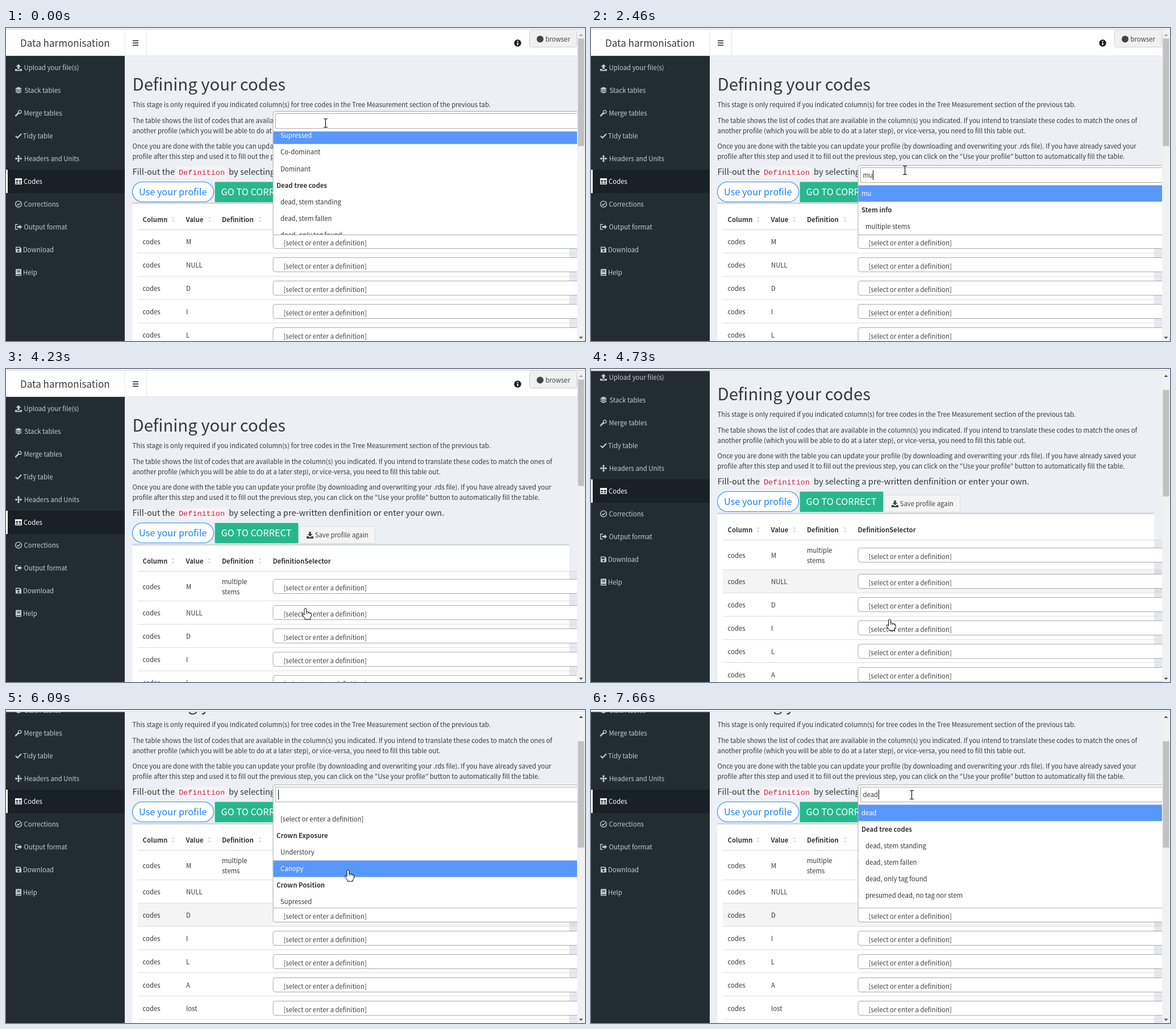
An HTML page with a canvas for the animation above (8000 ms loop, 1019 by 550 pixels).

```html
<!DOCTYPE html>
<html lang="en">
<head>
<meta charset="utf-8">
<title>Data harmonisation</title>
<style>
html, body { margin: 0; width: 100%; height: 100%; overflow: hidden; background: #ecf0f5; }
canvas { display: block; width: 1019px; height: 550px; }
</style>
</head>
<body>
<canvas id="stage" width="1019" height="550"></canvas>
<script>
const ctx = document.getElementById('stage').getContext('2d');
const LOOP = 8000, RIGHT = 1005, ITEM = 29.1, ROW = 40.9, TABLE_TOP = 355.8;
// The Korean face comes first because its curly quotes are proportional
const SANS = '"Noto Sans CJK KR", "Noto Sans CJK SC", "Noto Sans CJK JP", "Open Sans", sans-serif';
const INK = '#383838';
const PROMPT = '[select or enter a definition]';
const ZOOM = 0.909 / 1.117; // page zoom, corrected for the larger CJK Latin glyphs

const MENU = ['Upload your file(s)', 'Stack tables', 'Merge tables', 'Tidy table', 'Headers and Units',
  'Codes', 'Corrections', 'Output format', 'Download', 'Help'];
const MENU_X = [31.5, 32.5, 31.5, 30, 32, 31, 31.5, 31.5, 30, 30];
const VALUES = ['M', 'NULL', 'D', 'I', 'L', 'A', 'lost', 'B'];
const INTRO = [
  [139, 'This stage is only required if you indicated column(s) for tree codes in the Tree Measurement section of the previous tab.'],
  [166.5, 'The table shows the list of codes that are available in the column(s) you indicated. If you intend to translate these codes to match the ones of'],
  [184.7, 'another profile (which you will be able to do at a later step), or vice-versa, you need to fill this table out.'],
  [212, 'Once you are done with the table you can update your profile (by downloading and overwriting your .rds file). If you have already saved your'],
  [230.2, 'profile after this step and used it to fill out the previous step, you can click on the “Use your profile” button to automatically fill the table.']
];
const GROUPS = [
  ['', [PROMPT]],
  ['Crown Exposure', ['Understory', 'Canopy']],
  ['Crown Position', ['Supressed', 'Co-dominant', 'Dominant']],
  ['Dead tree codes', ['dead, stem standing', 'dead, stem fallen', 'dead, only tag found',
    'presumed dead, no tag nor stem', 'dead, cause unknown']],
  ['Stem info', ['multiple stems']]
];

// Stepped values: [start time, ...value]
const POINTER = [
  [0, 'beam', 562, 167], [2190, 'beam', 560, 186], [2310, 'beam', 557, 208], [2460, 'beam', 552, 250],
  [2580, 'hand', 545, 292], [2700, 'hand', 537, 337], [2820, 'hand', 533, 353], [2970, 'hand', 532.5, 352],
  [3830, 'hand', 529, 376], [3950, 'hand', 524, 398], [4100, 'hand', 525, 407], [4220, 'hand', 527, 420],
  [4350, 'hand', 528, 433], [4470, 'hand', 525.5, 439.5], [4970, 'hand', 536, 431], [5090, 'hand', 549, 415],
  [5210, 'hand', 562, 396], [5330, 'hand', 572, 379], [5450, 'hand', 577, 370], [5570, 'hand', 577.5, 369.5],
  [6090, 'hand', 602, 281], [6210, 'hand', 618, 194], [6360, 'hand', 592, 169],
  [6480, 'beam', 572, 152], [6600, 'beam', 564, 149]
];
const SCROLL = [[0, 0], [4730, 55], [4850, 109]];
const CARET = [[0, false], [120, true], [680, false], [830, true], [1610, false], [2190, true],
  [2700, false], [5840, true], [6360, false], [6600, true]];
const QUERY = [[0, ''], [830, 'm'], [1080, 'mu'], [3120, ''], [7250, 'd'], [7380, 'de'], [7660, 'dead']];
const PICK = [[0, 'Supressed'], [830, ''], [2700, 'multiple stems'], [5840, PROMPT],
  [6090, 'Canopy'], [6210, PROMPT], [7250, '']];

const at = (steps, t) => steps.filter(s => s[0] <= t).pop().slice(1);

function text(str, x, y, color = INK, size = 14, weight = 400) {
  ctx.font = `${weight} ${size * ZOOM}px ${SANS}`;
  ctx.fillStyle = color;
  ctx.fillText(str, x, Math.round(y));
}

function rect(x, y, w, h, color) {
  ctx.fillStyle = color;
  ctx.fillRect(x, y, w, h);
}

function panel(x, y, w, h, r, fill, stroke, width = 1) {
  ctx.beginPath();
  ctx.roundRect(x, y, w, h, r);
  ctx.fillStyle = fill;
  ctx.fill();
  if (!stroke) return;
  ctx.strokeStyle = stroke;
  ctx.lineWidth = width;
  ctx.stroke();
}

function disc(x, y, r, color) {
  ctx.beginPath();
  ctx.arc(x, y, r, 0, 7);
  ctx.fillStyle = color;
  ctx.fill();
}

const shapes = new Map();
function shape(d, x, y, fill, stroke, width = 1.6) {
  if (!shapes.has(d)) shapes.set(d, new Path2D(d));
  ctx.save();
  ctx.translate(x, y);
  if (fill) { ctx.fillStyle = fill; ctx.fill(shapes.get(d), 'evenodd'); }
  if (stroke) { ctx.strokeStyle = stroke; ctx.lineWidth = width; ctx.stroke(shapes.get(d)); }
  ctx.restore();
}

// Icons fit a 12px box centred on 0,0: [filled path, stroked path]
const ICONS = [
  ['M0-6L4.5-1.5H1.7V2.5H-1.7V-1.5H-4.5ZM-6 2.5H-2.7V4H2.7V2.5H6V6H-6Z'],
  ['M0-6L6-3.2L0-.6L-6-3.2ZM-6-.6L-4-1.4L0 .4L4-1.4L6-.6L0 2.2ZM-6 2.4L-4 1.5L0 3.4L4 1.5L6 2.4L0 5.4Z'],
  ['M-5.8 6V3.6L-.4-1.6L1.4 .4L-1 3H-2.4V4.4H-3.6V6Z', 'M4.9-2.2A2.7 2.7 0 1 1-.5-2.2A2.7 2.7 0 1 1 4.9-2.2Z'],
  [null, 'M-5 .3L-1.8 3.5L5-3.6'],
  ['M0-6.4L2.6-3.6H1V-1H3.6V-2.6L6.4 0L3.6 2.6V1H1V3.6H2.6L0 6.4L-2.6 3.6H-1V1H-3.6V2.6L-6.4 0L-3.6-2.6V-1H-1V-3.6H-2.6Z'],
  ['M-6-5H6V-2H-6Z', 'M-5.3-4.5H5.3V4.5H-5.3ZM0-3V4.5M-5.5 1.2H5.5'],
  [null, 'M5.4 0A5.4 5.4 0 1 1-5.4 0A5.4 5.4 0 1 1 5.4 0ZM-2.7 .2L-.8 2L2.8-1.8'],
  ['M1.8-4L6.2 0L1.8 4V1.4H-2.2V-1.4H1.8Z', 'M-1.2-4.3H-5.2V4.3H-1.2'],
  ['M-5-5H2.5L5-2.5V5H-5ZM-3.6-3.6V-1H2.2V-3.6ZM-1.6 2.2A1.6 1.6 0 1 0 1.6 2.2A1.6 1.6 0 1 0-1.6 2.2Z'],
  ['M-3.5-6H5V6H-3.5Q-5 6-5 4.5V-4.5Q-5-6-3.5-6ZM-2.5-3.4V-2.4H3V-3.4ZM-2.5-1.4V-.4H3V-1.4ZM-3.4 3.2V4.6H3.8V3.2Z']
];
const SAVE_ICON = 'M-1.7-6H1.7V-2H4.5L0 2.5L-4.5-2H-1.7ZM-6 2H-3L0 4.2L3 2H6V6H-6Z';
const HAND = 'M-2 1.6Q0-1.4 2 1.6V7Q4 5.6 5 7.6Q7 6.4 8 8.6Q10.5 8 10.5 10.5V14L8.5 17.5V20H-1V18L-5 12.8Q-6.4 10.4-4.2 10L-2 12Z';
const FINGERS = 'M2 6.5V10.5M5 7.5V10.5M8 8.5V11';
const BEAM = 'M-3.5-7.5H-1Q0-7.5 0-6.5Q0-7.5 1-7.5H3.5M0-6.5V6.5M-3.5 7.5H-1Q0 7.5 0 6.5Q0 7.5 1 7.5H3.5';

function drawHeader() {
  rect(0, 0, RIGHT, 49, '#fff');
  rect(0, 48.5, RIGHT, 1, '#dfe2e6');
  rect(208.5, 4, 1, 45, '#e4e6e9');
  rect(247, 4, 1, 45, '#e4e6e9');
  text('Data harmonisation', 25, 33, '#3c3c3c', 21);
  for (let i = 0; i < 3; i++) rect(223, 21.5 + 4 * i, 10, 1.7, '#333');
  disc(900.5, 26.5, 6.2, '#222');
  rect(899.5, 22.6, 2, 2, '#fff');
  rect(899.5, 25.8, 2, 4.3, '#fff');
  panel(921.5, 3.5, 83, 30, 3, '#f0f0f0', '#cfcfcf');
  disc(940, 19.5, 6, '#444');
  text('browser', 949.5, 24, '#444');
}

function drawSidebar() {
  rect(0, 49, 209, 700, '#222d32');
  rect(0, 249, 209, 41, '#182125');
  rect(0, 249, 3, 41, '#fff');
  MENU.forEach((label, i) => {
    const y = 69.5 + 40 * i, color = i === 5 ? '#fff' : '#c3cccf';
    const [fill, line] = ICONS[i];
    if (fill) shape(fill, 22, y, color);
    if (line) shape(line, 22, y, null, color, i === 3 ? 2.2 : 1.4);
    text(label, MENU_X[i], y + 4.5, color);
  });
}

function drawIntro(saved) {
  text('Defining your codes', 222.5, 110, INK, 36);
  INTRO.forEach(([y, line]) => text(line, 222.5, y));
  text('Fill-out the', 222.5, 258, INK, 18);
  panel(300, 244, 88.5, 20, 3, '#f9f2f4');
  ctx.font = '13.5px "Liberation Mono", monospace';
  ctx.fillStyle = '#c7254e';
  ctx.fillText('Definition', 304, 258);
  text('by selecting a pre-written denfinition or enter your own.', 392, 258, INK, 18);
  panel(222.5, 270.5, 143, 35, 17.5, '#fff', '#2a8af6', 1.1);
  text('Use your profile', 234, 294, '#1a82f7', 20);
  panel(367.6, 270.6, 146.8, 35.6, 1, '#28b78d');
  text('GO TO CORRECT', 378.5, 294, '#fff', 20);
  if (!saved) return;
  panel(516.5, 276.5, 133, 30, 3, '#f4f4f4', '#ddd');
  shape(SAVE_ICON, 535, 292, '#444');
  text('Save profile again', 543.6, 296, '#444');
}

function rowBox(i, filled) {
  const grow = filled ? 10.9 : 0;
  return { top: TABLE_TOP + ROW * i + (i ? grow : 0), h: ROW + (i ? 0 : grow) };
}

function drawTable(t, hover) {
  const filled = t >= 3530;
  ctx.save();
  if (t < 3120) ctx.translate(0, -1);
  rect(991, 356, 14, 400, '#e5e8f0');
  rect(222.5, 308, 768.5, 440, '#fff');
  rect(222.5, 307.5, 768.5, 2.7, '#d2d6de');
  [['Column', 240.5, 294], ['Value', 316.5, 358], ['Definition', 380, 447], ['DefinitionSelector', 469.5]]
    .forEach(([label, x, sort]) => {
      text(label, x, 342, INK, 14, 700);
      if (sort) shape('M-2.5-2.5L0-5.5L2.5-2.5ZM-2.5 1L0 4L2.5 1Z', sort, 338, '#d3d3d3');
    });
  rect(232, 355, RIGHT - 232, 1, '#d6d6d6');
  VALUES.forEach((value, i) => {
    const { top, h } = rowBox(i, filled), mid = top + h / 2, base = mid + 5.2;
    if (i === hover) rect(232, Math.round(top), RIGHT - 232, Math.round(h), 'rgba(0,0,0,.045)');
    rect(232, Math.round(top + h - 0.8), RIGHT - 232, 1, '#dedede');
    text('codes', 240.5, base);
    text(value, 317, base);
    if (filled && i === 0) {
      text('multiple', 380, base - 9.1);
      text('stems', 380, base + 9.1);
    }
    panel(470, Math.floor(mid - 12.5) + 0.5, 560, 25, 4, '#fff', '#aaa');
    const chosen = i === 0 && t >= 3120 && !filled;
    text(chosen ? 'multiple stems' : PROMPT, 488.5, mid + 7.2, '#444');
  });
  ctx.restore();
}

function listItems(query) {
  const items = query ? [{ label: query, x: 476, h: ITEM, tag: true }] : [];
  for (const [title, options] of GROUPS) {
    const found = options.filter(o => o.toLowerCase().includes(query));
    if (!found.length) continue;
    items.push({ label: title, x: 476, h: title ? ITEM : 10.9, bold: true });
    found.forEach(label => items.push({ label, x: 483, h: ITEM }));
  }
  return items;
}

function drawDropdown(t) {
  const [query] = at(QUERY, t), [pick] = at(PICK, t);
  const bottom = t < 3120 ? 363.5 : 348;
  const items = listItems(query);
  const height = Math.min(181.8, items.reduce((sum, item) => sum + item.h, 0));
  const listTop = bottom - height, top = Math.round(listTop - 35.5);
  panel(470, top + 0.5, 560, bottom - top - 0.5, [4, 4, 0, 0], '#fff', '#aaa');
  panel(474.5, top + 4.5, 560, 26, 0, '#fff', '#aaa');
  text(query, 478.5, top + 22);
  if (at(CARET, t)[0]) rect(Math.round(479 + ctx.measureText(query).width), top + 9, 1, 17, '#000');

  ctx.save();
  ctx.beginPath();
  ctx.rect(470.5, listTop, RIGHT - 470, height - 0.5);
  ctx.clip();
  let y = listTop - (t < 830 ? 163.4 : 0);
  for (const { label, x, h, bold, tag } of items) {
    const active = pick ? label === pick : tag;
    if (active) rect(470, y, RIGHT - 470, h, '#5897fb');
    text(label, x, y + 18.7, active ? '#fff' : INK, 14, bold ? 700 : 400);
    y += h;
  }
  ctx.restore();
}

function drawScrollbar(scroll, filled) {
  rect(RIGHT, 4, 14, 546, '#f1f1f1');
  rect(1006.5, 18.5 + scroll / 3, 11, filled ? 187 : 189, '#c1c1c1');
  shape('M-3.5 2L0-1.8L3.5 2Z', 1012, 12, scroll ? '#505050' : '#a3a3a3');
  shape('M-3.5-2L0 1.8L3.5-2Z', 1012, 544.5, '#505050');
}

function drawPointer([kind, x, y]) {
  if (kind === 'beam') return shape(BEAM, x + 0.5, y, null, '#000', 1.1);
  shape(HAND, x, y, '#fff', '#000', 1);
  shape(FINGERS, x, y, null, '#000', 0.8);
}

function hoveredRow(t, pointer, scroll) {
  if (t < 4730) return -1;
  if (t < 4850) return 1;
  if (t >= 5450) return 2;
  const y = pointer[2] + scroll;
  return VALUES.findIndex((v, i) => {
    const { top, h } = rowBox(i, true);
    return y >= top && y < top + h;
  });
}

function draw(t) {
  const [scroll] = at(SCROLL, t), pointer = at(POINTER, t);
  rect(0, 0, 1019, 550, '#ecf0f5');
  ctx.save();
  ctx.translate(0, -scroll);
  drawHeader();
  drawSidebar();
  drawIntro(t >= 3120);
  drawTable(t, hoveredRow(t, pointer, scroll));
  ctx.restore();
  if (t < 3120 || t >= 5840) drawDropdown(t);
  drawScrollbar(scroll, t >= 3530);
  rect(0, 0, 1019, 3.5, '#f4f4f4');
  rect(0, 2, 1019, 1, '#dadada');
  drawPointer(pointer);
}

const start = performance.now();
function tick() {
  draw((performance.now() - start) % LOOP);
  requestAnimationFrame(tick);
}
tick();
</script>
</body>
</html>
```
